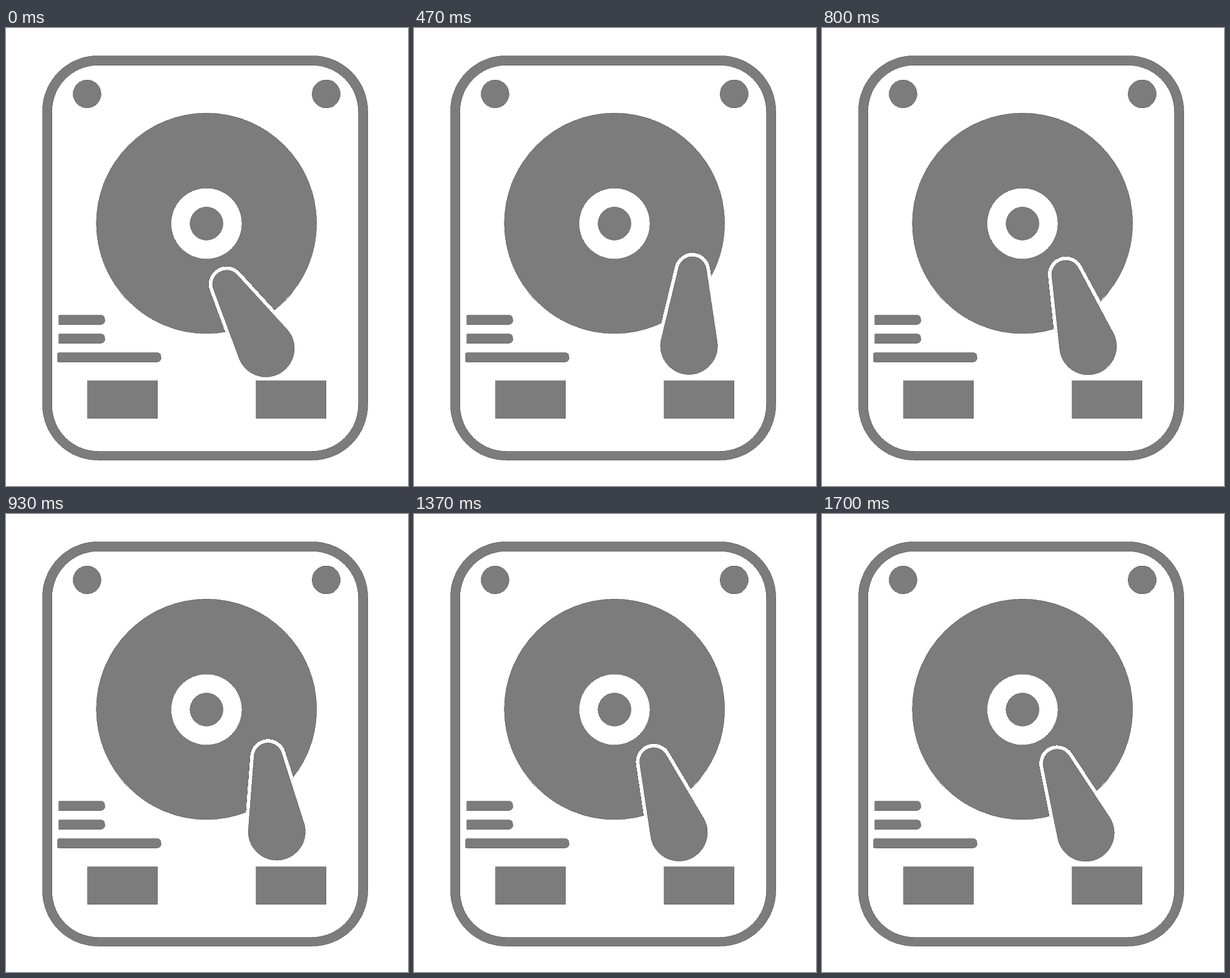
An HTML page that plays this animation: 644x733 px, repeating every 2030 ms.

```html
<!DOCTYPE html>
<html lang="en">
<head>
<meta charset="utf-8">
<title>Hard drive</title>
<style>
  html, body { margin: 0; width: 100%; height: 100%; overflow: hidden; background: #fff; }
  svg { display: block; width: 644px; height: 733px; shape-rendering: crispEdges; }
  .ink { fill: #7c7c7c; stroke: #5c5c5c; stroke-width: .7; }
  .paper { fill: #fff; }
</style>
</head>
<body>
<svg viewBox="0 0 644 733">
  <defs>
    <path id="arm" d="M-22.1-124.8A22.5 22.5 0 0 1 22.1-124.8L44.8-8.7A45.6 45.6 0 1 1-44.8-8.7Z"/>
    <clipPath id="platter"><circle cx="321.2" cy="312.6" r="176.9"/></clipPath>
  </defs>

  <g class="ink">
    <rect x="58.5" y="44.5" width="521" height="647" rx="88.5"/>
    <rect class="paper" x="73.5" y="59.5" width="491" height="618" rx="74"/>
    <circle cx="129.9" cy="105.5" r="22.3"/>
    <circle cx="512.9" cy="105.5" r="22.5"/>

    <circle cx="321.2" cy="312.6" r="176.4"/>
    <circle class="paper" cx="321.2" cy="313" r="57"/>
    <circle cx="321.2" cy="313" r="26.4"/>
  </g>

  <g clip-path="url(#platter)">
    <use href="#arm" fill="none" stroke="#5c5c5c" stroke-width="13.2"/>
    <use href="#arm" fill="none" stroke="#fff" stroke-width="12.2"/>
  </g>
  <use href="#arm" class="ink"/>

  <g class="ink">
    <path d="M84.5 459.5H152a6 6 0 0 1 6 6v3a6 6 0 0 1-6 6H84.5Z"/>
    <path d="M84.5 489.5H152a6 6 0 0 1 6 6v3a6 6 0 0 1-6 6H84.5Z"/>
    <path d="M83.5 519.5H242a6 6 0 0 1 6 6v3a6 6 0 0 1-6 6H83.5l-1-1v-13Z"/>
    <rect x="130.5" y="564.5" width="112" height="60"/>
    <rect x="400.5" y="564.5" width="112" height="60"/>
  </g>
</svg>
<script>
  const LOOP = 2030, DELAY = 130;
  // [tick, degrees], at 30 ticks per second after the delay
  const swing = [[-1, 0], [9, 35.1], [17, 9.1], [25, 25.5], [33, 9.1], [41, 14.6], [47, 9.1]];
  const arm = document.getElementById('arm');
  const smooth = u => u * u * (3 - 2 * u);

  function angle(tick) {
    const k = Math.min(47, Math.max(-1, tick));
    const i = swing.findIndex(([end]) => end >= k);
    if (i === 0) return 0;
    const [k0, a0] = swing[i - 1], [k1, a1] = swing[i];
    return a0 + (a1 - a0) * smooth((k - k0) / (k1 - k0));
  }

  function draw(ms) {
    const t = Math.floor(ms % LOOP / 10) * 10;
    const tick = Math.floor((t - DELAY) * 3 / 100);
    arm.setAttribute('transform',
      `rotate(${angle(tick)} 435 550.5) translate(416.4 513) rotate(-31.45)`);
  }

  const start = performance.now();
  function loop(now) {
    draw(Math.max(0, now - start));
    requestAnimationFrame(loop);
  }
  draw(0);
  requestAnimationFrame(loop);
</script>
</body>
</html>
```
